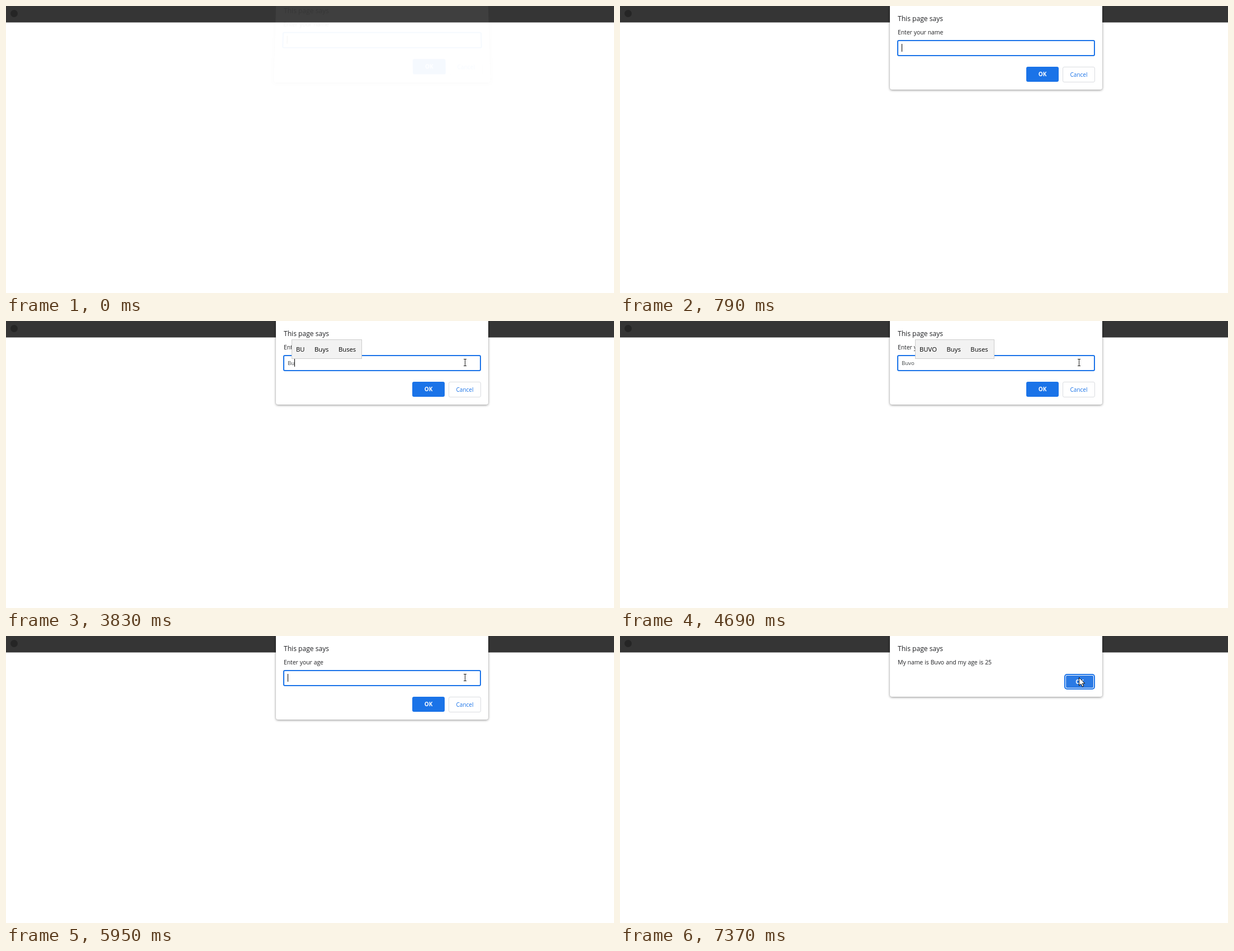
Animation, 1088 px wide and 515 px high, one loop 9.39 s. Source, as an HTML page:

```html
<!DOCTYPE html>
<html lang="en">
<head>
<meta charset="utf-8">
<title>Prompt dialogs</title>
<style>
  html, body { margin: 0; width: 100%; height: 100%; overflow: hidden; background: #fff; }
  body { position: relative; font-family: "Open Sans", "Noto Sans", sans-serif; color: #202124; }
  body * { position: absolute; box-sizing: border-box; white-space: pre; }
  header { left: 0; top: 0; width: 100%; height: 30px; background: #353535; border-bottom: 1px solid #999; }
  header i { left: 8px; top: 7px; width: 13px; height: 13px; border-radius: 50%; background: #252525; }
  .dialog { left: 483px; top: 0; width: 380px; height: 150px; background: #fff;
    border-radius: 0 0 4px 4px; box-shadow: 0 1px 4px rgba(0, 0, 0, .45); }
  .alert { height: 109px; }
  h1 { left: 14px; top: 13px; margin: 0; font-size: 12.1px; font-weight: 400; line-height: 20px; }
  p { left: 14px; top: 37px; margin: 0; font-size: 10.5px; line-height: 20px;
    letter-spacing: -.1px; word-spacing: .4px; }
  .field { left: 13px; top: 61px; width: 354px; height: 29px; border: 2px solid #1a73e8; border-radius: 3px; }
  .blur { border-color: #dadce0; }
  .value { left: 6px; top: 0; font-size: 9.6px; line-height: 25px; color: #3c4043; }
  .caret { left: 100%; top: 5px; width: 1px; height: 14px; background: #000; }
  .button { top: 109px; width: 58px; height: 27px; border-radius: 3px; font-size: 10px;
    line-height: 27px; text-align: center; }
  .ok { left: 244px; background: #1a73e8; color: #fff; font-weight: 700; }
  .cancel { left: 309px; height: 28px; border: 1px solid #dadce0; color: #1a73e8; font-weight: 500; }
  .alert .ok { left: 315px; top: 71px; width: 49px; height: 22px; line-height: 22px; border-radius: 2px;
    background: #2b7ae4; box-shadow: 0 0 0 1px #fff, 0 0 0 3px #1a73e8; }
  #popup { top: 33px; height: 35px; padding: 0 10px 0 7px; border: 1px solid #ccc; background: #f2f2f2;
    display: flex; gap: 17.5px; font-size: 11.3px; line-height: 34px; color: #000; }
  .value span, #popup span { position: static; }
  svg { left: 0; top: 0; overflow: visible; }
</style>
</head>
<body>
<header><i></i></header>
<div id="stage"></div>
<div id="popup"><span id="guess"></span><span>Buys</span><span>Buses</span></div>
<svg width="1" height="1">
  <path id="arrow" d="M0 0V14.5L3.4 11.4L5.8 16.6L8.2 15.5L5.9 10.5H10.3Z" fill="#fff" stroke="#000"/>
  <path id="beam" d="M-2.5 -6H2.5M0 -6V6M-2.5 6H2.5" fill="none" stroke="#222"/>
</svg>
<script>
const LOOP = 9390, STEP = 70, BLINK = 520, POPUP_DELAY = 240;
const $ = id => document.getElementById(id);
const show = (el, on) => { el.style.visibility = on ? 'visible' : 'hidden'; };
const mix = (a, b, u) => a + (b - a) * u;

// 0 before start, then rises to 1 in equal jumps
function progress(t, start, steps) {
  const done = Math.floor((t - start) / STEP) + 1;
  return Math.min(Math.max(done, 0), steps) / steps;
}

// A new dialog lies below the one that is closing
function addDialog(dialog) {
  const { label, keys } = dialog;
  const box = dialog.box = document.createElement('div');
  box.className = keys ? 'dialog' : 'dialog alert';
  box.innerHTML = `<h1>This page says</h1><p>${label}</p><div class="button ok">OK</div>` + (keys ?
    '<div class="button cancel">Cancel</div>' +
    '<div class="field"><div class="value"><span></span><i class="caret"></i></div></div>' : '');
  $('stage').prepend(box);
  return dialog;
}

// focus: start of the caret's blinking; keys: time of each letter
const dialogs = [
  { label: 'Enter your name', open: 100, close: 4850, focus: -255, text: 'Buvo', keys: [3430, 3660, 4060, 4140] },
  { label: 'Enter your age', open: 4920, close: 7220, focus: 4880, text: '25', keys: [6350, 6720] },
  { label: 'My name is Buvo and my age is 25', open: 7220, close: LOOP }
].map(addDialog);

const pressed = (keys, t) => keys.filter(key => key <= t);

function drawDialog({ box, open, close, focus, text, keys }, t) {
  const away = 1 - progress(t, open, 3), gone = progress(t, close, 3);
  const tilt = away ** 2.5 + gone ** .75;
  const scale = 1 + .008 * tilt;
  show(box, t >= open - 100 && gone < 1);
  box.style.opacity = (1 - .95 * away ** 2) * (1 - gone ** 1.2);
  box.style.transform = tilt ? `matrix3d(${scale},0,0,0, 0,${scale},0,${-.00015 * tilt}, ` +
    `0,0,1,0, 0,${-14.3 * tilt},0,1)` : 'none';
  if (!keys) return;

  const typed = pressed(keys, t);
  const sinceKey = t - (typed.at(-1) ?? focus);
  box.querySelector('.field').classList.toggle('blur', gone > 0);
  box.querySelector('.value span').textContent = text.slice(0, typed.length);
  box.querySelector('.caret').style.opacity = !gone && Math.floor(sinceKey / BLINK) % 2 === 0 ? 1 : 0;
}

// The suggestions follow the caret a little late
function drawPopup({ text, keys, close }, t) {
  const reached = pressed(keys, t - POPUP_DELAY).length;
  show($('popup'), reached && t < close);
  $('popup').style.left = Math.round(505.5 + 5.6 * reached) + 'px';
  $('guess').textContent = text.slice(0, pressed(keys, t).length).toUpperCase();
}

function drawPointer(t) {
  const enter = progress(t, 940, 5), settle = progress(t, 1410, 4);
  const x = mix(963, 853, enter) + mix(0, -32, 1 - (1 - settle) ** 1.5);
  const y = mix(88, 75, enter) - 14 * Math.sin(Math.PI * enter);
  const shape = settle && t < 7290 ? 'beam' : 'arrow';
  for (const id of ['arrow', 'beam']) {
    show($(id), enter && id === shape);
    $(id).setAttribute('transform', `translate(${x + .5} ${y - .5})`);
  }
}

function draw(now) {
  const t = now % LOOP;
  dialogs.forEach(dialog => drawDialog(dialog, t));
  drawPopup(dialogs[0], t);
  drawPointer(t);
}

let start;
function tick(now) {
  start ??= now;
  draw(now - start);
  requestAnimationFrame(tick);
}
draw(0);
requestAnimationFrame(tick);
</script>
</body>
</html>
```
